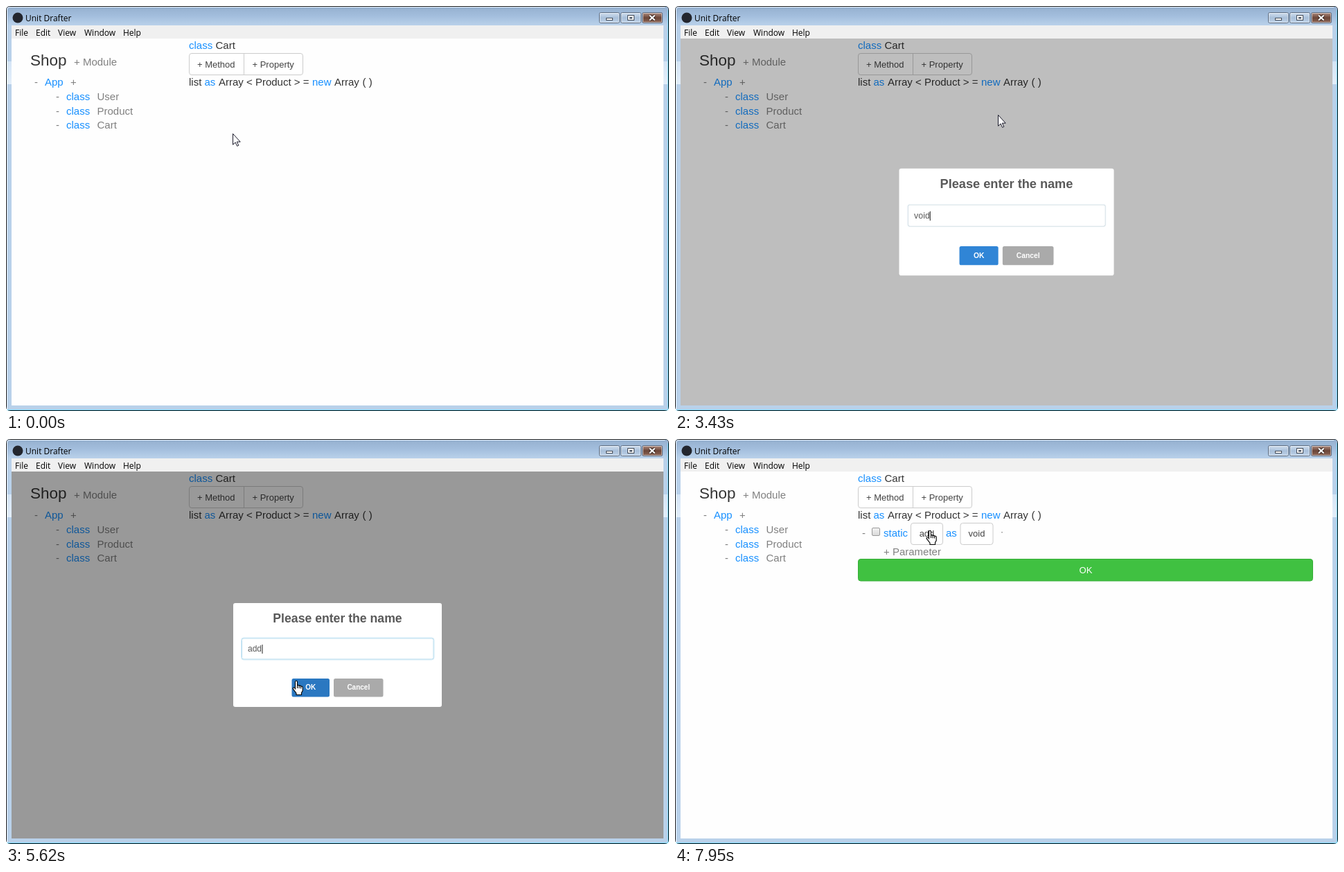
Animation, 957 px wide and 585 px high, one loop 8 s. Source, as an HTML page:

```html
<!DOCTYPE html>
<html lang="en">
<head>
<meta charset="utf-8">
<title>Unit Drafter</title>
<style>
html, body { margin: 0; width: 100%; height: 100%; overflow: hidden; background: #fff; }
svg { display: block; width: 957px; height: 585px; }
text { font-family: "Liberation Sans", Arial, sans-serif; white-space: pre; }
.ui { font-family: "Open Sans", "Noto Sans", sans-serif; }
</style>
</head>
<body>
<svg id="stage" viewBox="0 0 957 585" xmlns="http://www.w3.org/2000/svg"></svg>
<script>
const LOOP = 8000, STEP = 78;
const BLUE = '#1890ff', GREY = '#808080', INK = '#333';

const text = (x, y, s, fill = INK, size = 15, more = '') =>
  `<text x="${x}" y="${y}" fill="${fill}" font-size="${size}" ${more}>${s}</text>`;
const ui = (x, y, s) => text(x, y, s, '#000', 12, 'class="ui"');
const mid = (x, y, s, fill, size, more = '') =>
  text(x, y, s, fill, size, 'text-anchor="middle" ' + more);
const rect = (x, y, w, h, fill, more = '') =>
  `<rect x="${x}" y="${y}" width="${w}" height="${h}" fill="${fill}" ${more}/>`;
const group = (id, body) => `<g id="${id}">${body}</g>`;
const grad = (id, ...stops) => `<linearGradient id="${id}" x2="0" y2="1">` +
  stops.map(([o, c]) => `<stop offset="${o}" stop-color="${c}"/>`).join('') + '</linearGradient>';
const outline = 'rx="3.5" stroke="#ccc"';

function caption(x, fill, glyph) {
  return rect(x + .5, 9.5, 29, 15, fill, 'rx="2" stroke="#5b6b80"') +
    rect(x + 1.5, 10.5, 27, 13, 'none', 'rx="1" stroke="#fff" stroke-opacity=".5"') + glyph;
}

function windowFrame() {
  const edge = x => rect(x, 28, 7, 555, '#b9d1ea') + rect(x, 80, 7, 33, 'url(#glow)');
  return rect(.5, .5, 956, 584, '#b9d1ea', 'rx="5" stroke="#15181c"') +
    rect(1, 1, 955, 27, 'url(#bar)', 'rx="4"') +
    edge(1) + edge(949) +
    '<path d="M1.5 583V6q0-4.5 4.5-4.5h945" fill="none" stroke="#eef5fc"/>' +
    '<path d="M955.5 6v577.5H1.5" fill="none" stroke="#6fd3f2"/>' +
    '<circle cx="17" cy="17" r="7.5" fill="#23262e"/>' +
    ui(28, 21.5, 'Unit Drafter') +
    caption(856, 'url(#btn)', rect(866.5, 17.5, 9, 3, '#fff', 'stroke="#444c58"')) +
    caption(887, 'url(#btn)', rect(897.5, 13.5, 9, 7, '#fff', 'stroke="#444c58"') +
      rect(900.5, 16.5, 3, 1.5, '#9cb0c8', 'stroke="#444c58"')) +
    caption(918, 'url(#close)', ['#382620" stroke-width="4.2', '#fff" stroke-width="2.2'].map(c =>
      `<path d="M929 13.5l7.5 7M936.5 13.5l-7.5 7" stroke="${c}"/>`).join('')) +
    rect(8, 28, 941, 19, '#f0f0f0') +
    [[13, 'File'], [43, 'Edit'], [75, 'View'], [113, 'Window'], [169, 'Help']]
      .map(([x, s]) => ui(x, 42.5, s)).join('') +
    rect(8, 47, 941, 530, '#fefefe');
}

function sidebar() {
  return text(35, 86, 'Shop', INK, 22.5) + text(98, 86, '+ Module', GREY) +
    text(41, 115, '-', GREY) + text(56, 115, 'App', BLUE) + text(93, 115, '+', GREY) +
    ['User', 'Product', 'Cart'].map((s, i) => {
      const y = Math.round(136 + i * 20.6);
      return text(72, y, '-', GREY) + text(87, y, 'class', BLUE) + text(131.5, y, s, GREY);
    }).join('');
}

function editor() {
  return text(264, 62, 'class', BLUE) + text(302.5, 62, 'Cart') +
    rect(264.5, 68.5, 164, 31, '#fff', outline) +
    rect(264.5, 68.5, 79, 31, '#e6e6e6', 'id="hover" rx="3" stroke="#adadad"') +
    '<path d="M343.5 69v30" stroke="#ccc"/>' +
    text(276, 89, '+ Method', '#444', 13) + text(355.5, 89, '+ Property', '#444', 13) +
    text(264, 115, 'list') + text(286.5, 115, 'as', BLUE) +
    text(307, 115, 'Array &lt; Product &gt; =') +
    text(442, 115, 'new', BLUE) + text(474, 115, 'Array') + text(514.5, 115, '( )');
}

const methodRow = () => text(269.5, 136, '*', GREY) + text(285.5, 136, 'add ( )') +
  text(333, 136, 'as', BLUE) + text(353, 136, 'void');

function methodForm() {
  return text(270, 141, '-', GREY) +
    rect(284.5, 128.5, 11, 11, 'url(#check)', 'rx="1.5" stroke="#9a9a9a"') +
    text(301, 140.5, 'static', BLUE) +
    rect(340.5, 121.5, 46, 31, '#fff', outline) + mid(363.5, 141, 'add', '#444', 13) +
    text(391, 140.5, 'as', BLUE) +
    rect(412, 121.5, 47, 31, '#fff', outline) + mid(435.5, 141, 'void', '#444', 13) +
    rect(471, 134, 2, 1.5, '#aaa') +
    text(301, 167.5, '+ Parameter', GREY) +
    rect(264.5, 173.5, 656, 31.5, '#40c141', 'rx="3.5" stroke="#37ae38"') +
    mid(593, 194, 'OK', '#fff', 13);
}

function menu(id, x, w, labels, arrows) {
  const h = labels.length * 22.6 + 4.5;
  return group(id,
    rect(x + 4, 86, w, h, '#000', 'opacity=".18"') + rect(x + 3, 85, w, h, '#000', 'opacity=".4"') +
    rect(x + .5, 81.5, w, h, '#fff', 'stroke="#a3a3a3"') +
    rect(x + 2, 84, w - 3, 22.6, '#ebebeb', `id="${id}Row"`) +
    labels.map((s, i) => {
      const y = 100 + i * 22.6;
      return ui(x + 24.5, y, s) +
        (arrows ? `<path d="M${x + 78.5} ${y - 8}v7l4-3.5z" fill="#555"/>` : '');
    }).join(''));
}

function dialog() {
  return group('modal',
    rect(328, 237, 301, 150, '#fff', 'rx="3"') +
    mid(478.5, 264.5, 'Please enter the name', '#595959', 17.65, 'font-weight="bold"') +
    rect(339.5, 287, 278.5, 32, 'none', 'id="ring" rx="3.5" stroke="#d4ecf8"') +
    rect(340.5, 288, 276.5, 30, '#fff', 'id="field" rx="2.5"') +
    rect(349, 297, 22, 14, '#3390ff', 'id="select"') +
    text(349, 307, '', '#595959', 12, 'id="entry"') +
    rect(369.5, 297, 1, 13, '#222', 'id="caret"') +
    rect(412.5, 346, 54.5, 26.5, '#3085d6', 'id="ok" rx="2.5"') +
    mid(439.8, 362, 'OK', '#fff', 10, 'font-weight="bold"') +
    rect(473, 346, 71.5, 26.5, '#aaa', 'rx="2.5"') +
    mid(508.8, 362, 'Cancel', '#fff', 10, 'font-weight="bold"'));
}

const pointers = group('cursor',
  '<path d="M-.5.5v15.8l3.6-3.3 2.5 5.4 2.2-1-2.5-5.2h4.9z" fill="#fff" stroke="#1a1a2a"/>' +
  '<path d="M-1.5 9.5V2q0-1.7 1.5-1.7T1.5 2v5q1.3-.9 2.6.4 1.5-.7 2.5.7 2.6-.3 2.6 2v4.4l-1.7 3.2v2.8H0v-2.3l-4.6-6q-.7-1.7.7-2.2 1.2-.2 2.4 1.6zM1.5 7v4M4.1 7.4v3.8M6.6 8.1v3.4" fill="#fff" stroke="#000" stroke-width="1.1"/>' +
  '<path d="M-3.5-8.5h2.6l.9.8.9-.8h2.6M-3.5 8.5h2.6l.9-.8.9.8h2.6M0-8V8" fill="none" stroke="#222"/>');

const stage = document.getElementById('stage');
stage.innerHTML = '<defs>' +
  grad('bar', [0, '#95b0cf'], [.5, '#a3bedd'], [1, '#b9d1ea']) +
  grad('glow', [0, '#d5e5f6'], [1, '#e3eefa']) +
  grad('btn', [0, '#d3e0ef'], [.5, '#a9c0da'], [1, '#c0d3e8']) +
  grad('close', [0, '#b39184'], [.5, '#6b4538'], [1, '#916a5a']) +
  grad('check', [0, '#f3f3f3'], [1, '#d9d9d9']) + '</defs>' +
  windowFrame() + sidebar() + editor() + group('row', methodRow()) + group('form', methodForm()) +
  rect(8, 47, 941, 530, '#000', 'id="mask"') + dialog() +
  menu('main', 309, 91, ['Basic', 'Module', 'Type'], true) +
  menu('sub', 397, 93, ['boolean', 'number', 'string', 'void'], false) + pointers;

const el = {};
stage.querySelectorAll('[id]').forEach(n => el[n.id] = n);
const show = (n, on) => n.setAttribute('display', on ? 'inline' : 'none');
const set = (n, attrs) => { for (const a in attrs) n.setAttribute(a, attrs[a]); };

// Piecewise linear value; each key is [step, ...values].
function track(keys, k) {
  let i = 0;
  while (i < keys.length - 1 && keys[i + 1][0] <= k) i++;
  const a = keys[i], b = keys[i + 1] || a;
  const p = b === a ? 0 : Math.max(0, (k - a[0]) / (b[0] - a[0]));
  return a.slice(1).map((v, j) => v + (b[j + 1] - v) * p);
}

const PATH = [
  [0, 328, 184], [2, 317, 128], [3, 311, 92], [4, 309, 81], [15, 309, 81],
  [18, 320, 105], [19, 323, 110], [20, 323, 110], [22, 342, 95], [29, 342, 95],
  [31, 418, 116], [32, 466, 150], [33, 487, 161], [34, 487, 161], [37, 467, 157],
  [46, 467, 157], [51, 435, 318], [54, 435, 318], [58, 353, 306], [69, 353, 306],
  [72, 419, 349], [78, 436, 361], [91, 436, 361], [95, 361, 144], [96, 361, 144],
  [99, 361, 125], [100, 361, 125], [102, 368, 132]];
const MASK = [[42, 0], [45, .385], [46, .4], [91, .4], [94, 0]];
const MODAL = [ // scale, opacity
  [43, .75, .6], [44, 1.03, 1], [45, 1.013, 1], [46, .96, 1], [47, 1, 1],
  [88, 1, 1], [89, .85, .7], [90, .64, .25], [91, .5, .008]];
const FOCUS = [[43, 0], [45, .3], [47, 1], [75, 1], [78, 0]];

function pointerKind(k, x, y) {
  if (k < 10) return y < 100 ? 1 : 0;
  if (k > 48 && k < 90) return y > 345 ? 1 : y > 288 && y < 319 ? 2 : 0;
  return k > 101 ? 1 : 0;
}

function draw(t) {
  const k = Math.floor((t + 10) / STEP);
  const [x, y] = track(PATH, k).map(Math.round);
  const kind = pointerKind(k, x, y);
  set(el.cursor, { transform: `translate(${x} ${y})` });
  [...el.cursor.children].forEach((n, i) => show(n, i === kind));

  show(el.hover, k < 10 && y < 100);
  show(el.row, k >= 89 && k < 101);
  show(el.form, k >= 101);

  const line = Math.max(0, Math.floor((y - 84) / 22.6));
  show(el.main, k >= 10 && k < 42);
  set(el.main, { opacity: Math.min(1, (k - 9) * .34) });
  show(el.mainRow, k >= 16);
  set(el.mainRow, { y: 84 + (k < 26 ? Math.min(2, line) * 22.6 : 0) });
  show(el.sub, k >= 26 && k < 42);
  show(el.subRow, x > 397);
  set(el.subRow, { y: 84 + Math.min(3, line) * 22.6 });

  set(el.mask, { opacity: track(MASK, k)[0] });
  const [scale, alpha] = track(MODAL, k);
  show(el.modal, k >= 43 && k <= 91);
  set(el.modal, {
    opacity: alpha,
    transform: `translate(478.5 311.5) scale(${scale}) translate(-478.5 -311.5)`
  });

  const typed = k >= 67, picked = k >= 58 && !typed;
  const focus = track(FOCUS, k)[0];
  el.entry.textContent = typed ? 'add' : 'void';
  set(el.entry, { fill: picked ? '#fff' : '#595959' });
  show(el.select, picked);
  show(el.caret, !picked && k <= 75);
  set(el.caret, { x: typed ? 369.5 : 371 });
  set(el.ring, { opacity: focus });
  set(el.field, { stroke: `rgb(${217 - 37 * focus}, ${224 - 5 * focus}, ${228 + 9 * focus})` });
  set(el.ok, { fill: kind !== 1 ? '#3085d6' : k >= 76 ? '#266aab' : '#2b78c1' });
}

function tick(now) {
  draw(now % LOOP);
  requestAnimationFrame(tick);
}
draw(0);
requestAnimationFrame(tick);
</script>
</body>
</html>
```
